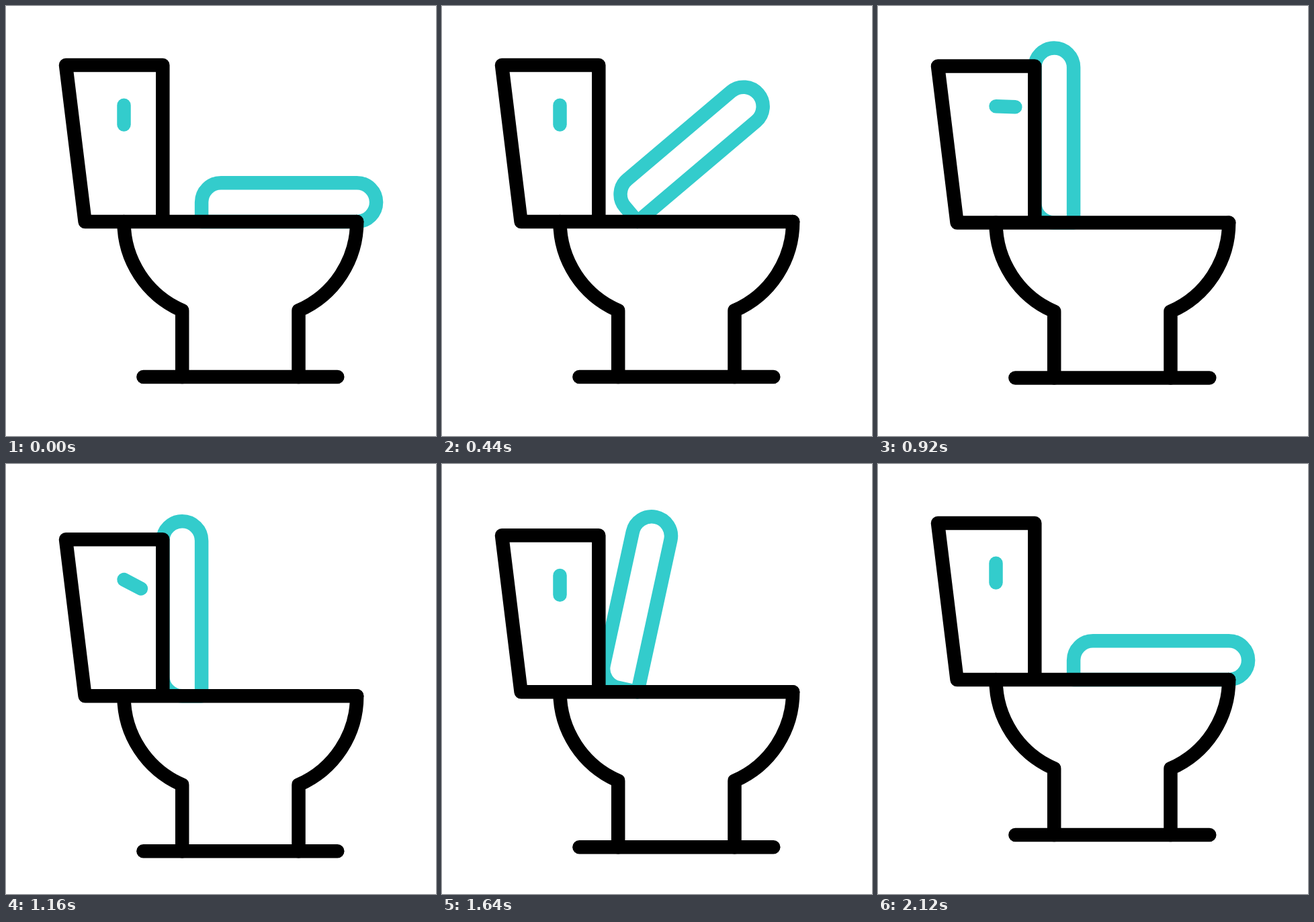
Recreate the animation shown at these times as an HTML page. Size 640 by 640 pixels, loop 2.2 s.

```html
<!DOCTYPE html>
<html lang="en">
<head>
<meta charset="utf-8">
<title>Toilet</title>
<style>
  html, body { margin: 0; width: 100%; height: 100%; overflow: hidden; background: #fff; }
  svg { display: block; width: 100%; height: 100%; }
  path { fill: none; stroke: #000; stroke-width: 20.5; stroke-linecap: round; stroke-linejoin: round; }
  .accent { stroke: #3cc; }
</style>
</head>
<body>
<svg viewBox="0 0 640 640">
  <g id="toilet">
    <path id="lid" class="accent" d="M291.1 321V292.1A28.9 28.9 0 0 1 320 263.2H522.2A28.9 28.9 0 0 1 522.2 321Z"/>
    <path id="handle" class="accent" d="M175.5 147.8V176.6"/>
    <path d="M233.3 321V88H89L117.6 321H522.2"/>
    <path d="M175.5 321A144 144 0 0 0 262.2 453.2V552"/>
    <path d="M522.2 321A144 144 0 0 1 435.5 453.2V552"/>
    <path d="M204.4 552H493.3"/>
  </g>
</svg>
<script>
const LOOP = 2200, STEP = 40, DROP = 33.7;
const [toilet, lid, handle] = ['toilet', 'lid', 'handle'].map(id => document.getElementById(id));

// Symmetric cubic Bezier easing (0.55, 0, 0.45, 1), solved by bisection.
function ease(x) {
  if (x <= 0) return 0;
  if (x >= 1) return 1;
  let low = 0, high = 1, s = 0.5;
  for (let i = 0; i < 30; i++) {
    s = (low + high) / 2;
    const r = 1 - s;
    if (1.65 * r * r * s + 1.35 * r * s * s + s ** 3 < x) low = s;
    else high = s;
  }
  return s * s * (3 - 2 * s);
}

const ramp = (t, from, to) => ease((t - from) / (to - from));
const thereAndBack = (t, a, b, c, d) => ramp(t, a, b) - ramp(t, c, d);

function render(time) {
  const t = Math.floor((time % LOOP) / STEP) * STEP;
  const lidAngle = -90 * thereAndBack(t, 40, 880, 1440, 2120);
  const handleAngle = -90 * thereAndBack(t, 540, 980, 980, 1420);
  const drop = DROP * thereAndBack(t, 820, 1380, 1380, 1920);
  toilet.setAttribute('transform', `translate(0 ${drop})`);
  lid.setAttribute('transform', `rotate(${lidAngle} 291.1 321)`);
  handle.setAttribute('transform', `rotate(${handleAngle} 175.5 147.8)`);
}

const start = performance.now();
function tick() {
  render(performance.now() - start);
  requestAnimationFrame(tick);
}
tick();
</script>
</body>
</html>
```
